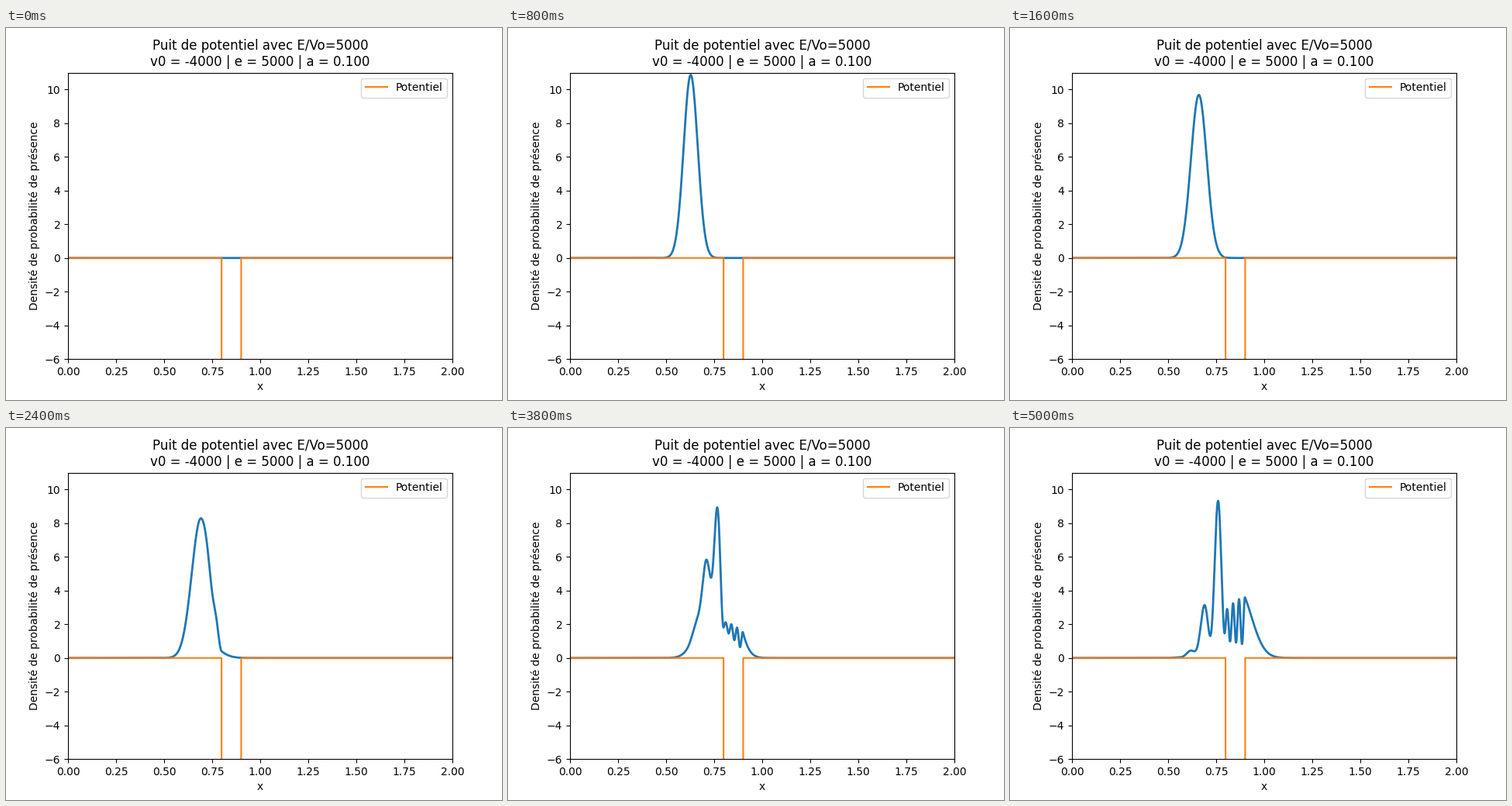
Animation, 640 px wide and 480 px high, one loop 5.1 s. Source, as a matplotlib script:

```python
import numpy as np
import matplotlib.pyplot as plt
from matplotlib.animation import FuncAnimation

# Space and time grid
DX, DT = 1e-3, 1e-7
NX = 2000
FRAMES, PAIRS = 51, 500      # pairs of half steps between two pictures
S = DT / DX**2

# Wave packet and square well
X0, SIGMA, K = 0.6, 0.05, 40.0
V0, LEFT, WIDTH = -4000, 0.8, 0.1

x = np.arange(NX) * DX
inside = (x > LEFT - DX / 2) & (x < LEFT + WIDTH + DX / 2)
potential = np.where(inside, V0, 0.0)


def simulate():
    """Solve the Schrodinger equation and keep one density per picture."""
    norm = 1 / np.sqrt(SIGMA * np.sqrt(np.pi))
    psi = norm * np.exp(1j * K * x - (x - X0)**2 / (2 * SIGMA**2))
    re, im = psi.real.copy(), psi.imag.copy()
    diag = 2 * (S + potential[1:-1] * DT)
    density = np.zeros((FRAMES, NX))    # the first picture is empty

    for j in range(1, FRAMES):
        for n in range(PAIRS):
            step = S * (re[2:] + re[:-2]) - diag * re[1:-1]
            if n == 0:
                old = im[1:-1].copy()
                density[j, 1:-1] = re[1:-1]**2 + old * (old + step)
            im[1:-1] += step
            re[1:-1] -= S * (im[2:] + im[:-2]) - diag * im[1:-1]
    return density


density = simulate()

plt.rcParams["font.family"] = "DejaVu Sans"
fig, ax = plt.subplots(figsize=(6.4, 4.8), dpi=100)
wave, = ax.plot([], [], lw=2)
ax.plot(x, potential, label="Potentiel")
ax.set_xlim(0, 2)
ax.set_ylim(-6, 11)
ax.set_title("Puit de potentiel avec E/Vo=5000\n"
             f"v0 = {V0} | e = 5000 | a = {WIDTH:.3f}")
ax.set_xlabel("x")
ax.set_ylabel("Densité de probabilité de présence")
ax.legend(loc="upper right")


def update(j):
    wave.set_data(x, density[j])
    return wave,


def init():
    return update(0)


anim = FuncAnimation(fig, update, frames=FRAMES, init_func=init,
                     interval=100, repeat=True, repeat_delay=0)
plt.show()
```
